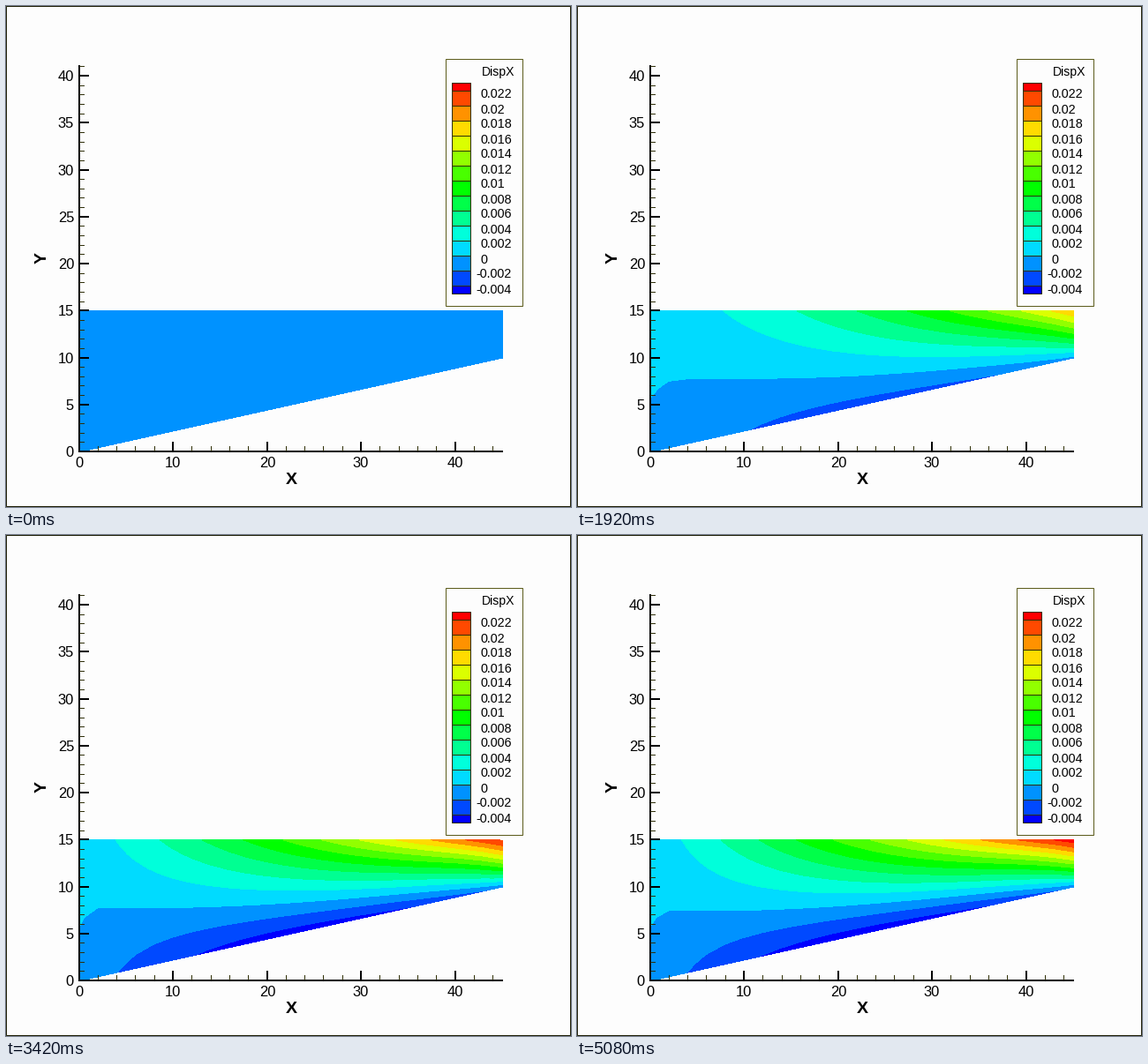
These frames come from a looping animation (640 px wide and 568 px high, 5.16 s). A matplotlib script:

```python
import numpy as np
import matplotlib.pyplot as plt
from matplotlib.animation import FuncAnimation
from matplotlib.patches import Rectangle

W, H, DPI = 640, 568, 100
FRAMES, LOOP_MS = 62, 5160
PX = 72 / DPI                        # one pixel in points
X0, Y0, UNIT = 83, 505.5, 10.65      # origin and pixels per data unit
LENGTH, TOP, TIP = 45, 15, 10        # wedge: length, top edge, base at the tip
INK, THIN, PAPER = "#000000", "#303008", "#fdfdfd"

LEVELS = np.r_[-99, np.arange(-4, 23, 2), 99]     # thousandths
BANDS = len(LEVELS) - 1


def rainbow(i):
    t = 4 * i / (BANDS - 1)
    return tuple(np.clip([t - 2, min(t, 4 - t), 2 - t], 0, 1))


COLORS = [rainbow(i) for i in range(BANDS)]

# Load history: strength of each part of the displacement at a few moments.
MOMENTS = [0, 14, 23, 35, 41, 53, 61]
STRETCH = [0, .145, .235, .43, .45, .51, .512]    # linear pull along the top
CURL = [0, 9.6, 7.7, 2.5, 2.2, 0, 0]              # cubic pull towards the tip
SAG = [0, 2.5, 2.7, 4.1, 5.0, 5.1, 5.15]          # push along the base
RIPPLE = [0, 1, 0, 0, 0, 0, 0]                    # passing wave

x = np.linspace(0, LENGTH, 24)[:, None]
eta = np.linspace(0, 1, 19)[None, :]              # 0 at the base, 1 at the top
base = x * TIP / LENGTH
MESH_X = X0 + UNIT * (x + 0 * eta)
MESH_Y = Y0 - UNIT * (base + eta * (TOP - base))


def field(n):
    stretch, curl, sag, ripple = (
        np.interp(n, MOMENTS, key) for key in (STRETCH, CURL, SAG, RIPPLE))
    load = min(n / MOMENTS[1], 1)
    r = x / LENGTH
    bow = 4 * eta * (1 - eta)

    top = stretch * x + curl * 1e-5 * x ** 3
    bottom = -sag * (x * (48 - x) / 576) ** 0.85
    edge = 0.8 * (load - 2 * ripple) * (eta - 0.38) * np.exp(-x / 6)
    bulge = top[-1] / 23 * (3.7 * r ** 12 - 2.2 * r ** 4) * bow
    wave = np.sin(np.pi * x / 32) * (1 - x / 60) * (2.5 - 3.9 * eta)
    wave = ripple * (wave + 0.45 * bow * np.exp(-x / 12))
    return bottom * (1 - eta) + top * eta + edge + bulge + wave - 1e-6


fig = plt.figure(figsize=(W / DPI, H / DPI), dpi=DPI, facecolor=PAPER)
ax = fig.add_axes([0, 0, 1, 1])
ax.axis("off")


def line(xs, ys, width=1, color=INK):
    ax.plot(xs, ys, color=color, lw=width * PX, solid_capstyle="butt",
            snap=False, zorder=3)


def label(px, py, text, size, **style):
    style = {"ha": "center", "va": "center_baseline", **style}
    ax.text(px, py, text, fontsize=size * PX, family="Liberation Sans",
            color=INK, zorder=5, **style)


def box(px, py, w, h, fill, edge):
    ax.add_patch(Rectangle((px, py), w, h, fc=fill, ec=edge, lw=PX,
                           snap=False, zorder=4))


def draw_axes():
    line([X0, X0], [67, 506], 2)
    line([X0 - 1, 563], [505, 505], 2)
    for v in range(42):
        py = int(Y0 - UNIT * v)
        if v % 5:
            line([X0, X0 + 6], [py + .5, py + .5], 1, THIN)
        else:
            line([X0, X0 + 11], [py, py], 2)
            label(77, py, str(v), 16.5, ha="right")
    for v in range(0, 45, 2):
        px = int(X0 + UNIT * v)
        if v % 10:
            line([px + .5, px + .5], [505, 499], 1, THIN)
        else:
            line([px, px], [505, 494], 2)
            label(px, 517, str(v), 16.5)
    label(323, 535, "X", 19.5, weight="bold")
    label(41, 286, "Y", 19.5, weight="bold", rotation=90, va="center")


def draw_legend():
    box(498.5, 60.5, 87, 280, PAPER, "#5c5c1c")
    label(557.5, 74, "DispX", 14)
    edges = np.r_[87.5, 96.5 + 17 * np.arange(BANDS - 1), 326.5]
    for upper, lower, color in zip(edges, edges[1:], COLORS[::-1]):
        box(505.5, upper, 21, lower - upper, color, THIN)
    for i, v in enumerate(range(22, -5, -2)):
        label(532 if v < 0 else 537, 99 + 17 * i, f"{v / 1000:g}", 14.4,
              ha="left")


box(0.5, 0.5, W - 1, H - 1, "none", "#1c1c04")
draw_axes()
draw_legend()
ax.set_xlim(0, W)
ax.set_ylim(H, 0)
shown = []


def update(n):
    while shown:
        shown.pop().remove()
    shown.append(ax.contourf(MESH_X, MESH_Y, field(n), levels=LEVELS,
                             colors=COLORS, zorder=1))
    return shown


anim = FuncAnimation(fig, update, frames=FRAMES, init_func=lambda: update(0),
                     interval=LOOP_MS / FRAMES, repeat=True, repeat_delay=0,
                     blit=False)
plt.show()
```
